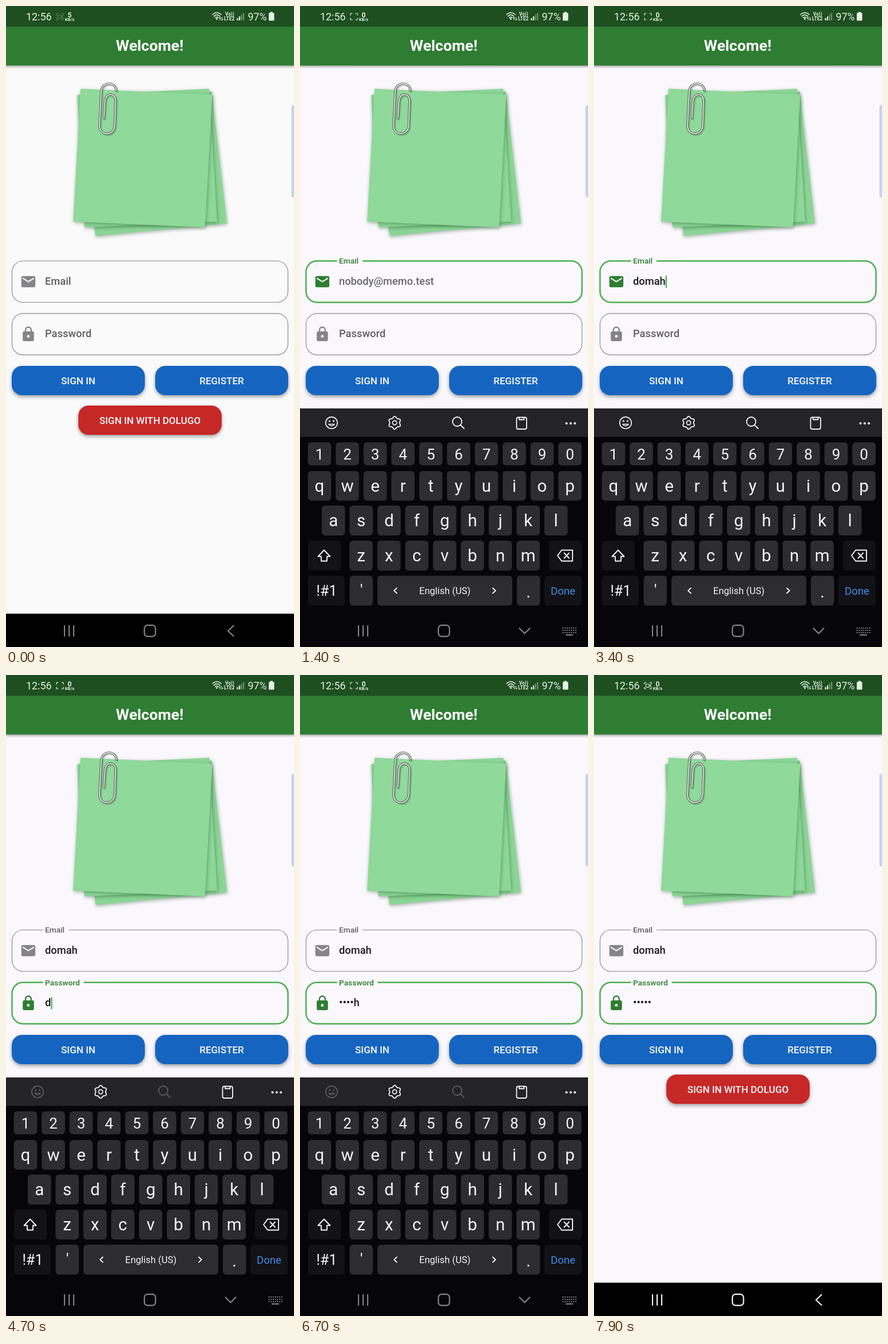
Write an HTML page that moves like this. It is 502 px wide and 1115 px high and loops after 8 s.

```html
<!DOCTYPE html>
<html lang="en">
<head>
<meta charset="utf-8">
<title>Sign in</title>
<style>
html, body { margin: 0; width: 100%; height: 100%; overflow: hidden; background: #000; }
svg { display: block; width: 502px; height: 1115px; }
text { font-family: Roboto, Inter, sans-serif; white-space: pre; }
.m { font-weight: 500; }
.line { fill: none; stroke-linecap: round; stroke-linejoin: round; }
.btn { filter: drop-shadow(0 3px 3px rgba(0, 0, 0, .36)); }
.sheet { filter: drop-shadow(1px 2px 3px rgba(20, 70, 30, .4)); }
</style>
</head>
<body>
<svg id="stage" viewBox="0 0 502 1115"></svg>
<script>
const LOOP = 8000, STEP = 100;
const WORD = 'domah', HINT = 'nobody@memo.test';
const GREEN = '#2e7d32', LIME = '#4caf50', GREY = '#5f5e61', ICON = '#858487';

const text = (x, y, s, size, fill, extra = '') =>
  `<text x="${x}" y="${y}" font-size="${size}" fill="${fill}" ${extra}>${s}</text>`;
const rect = (x, y, w, h, r, fill, extra = '') =>
  `<rect x="${x}" y="${y}" width="${w}" height="${h}" rx="${r}" fill="${fill}" ${extra}/>`;
const line = (d, color, width, extra = '') =>
  `<path class="line" d="${d}" stroke="${color}" stroke-width="${width}" ${extra}/>`;
const MID = 'text-anchor="middle"';

// Status bar
function statusBar() {
  const c = '#e6efe6';
  let s = rect(0, 0, 502, 36, 0, '#1d4f20');
  s += text(35, 25, '12:56', 17.9, c);
  s += line('M88 16V13H91M97 13H100V16M100 21V24H97M91 24H88V21', c, 1.2, 'id="corners"');
  s += `<g id="camera">${rect(90.5, 15.8, 5.6, 5.6, 1.2, 'none', `stroke="${c}" stroke-width="1.1"`)}
    ${line('M96.5 18L98.6 16.6V20.6L96.5 19.2', c, 1)}</g>`;
  s += text(111, 19.5, '', 12, c, `id="rate" font-weight="700" ${MID}`);
  s += text(111, 26.4, 'KB/s', 7.6, c, `font-weight="700" ${MID}`);
  s += line('M360 15Q367.5 8 375 15M362.4 17.8Q367.5 13 372.6 17.8M365 20.4Q367.5 18.2 370 20.4', c, 1.6);
  s += `<circle cx="367.5" cy="22.6" r="1.5" fill="${c}"/>`;
  s += line('M373.2 24.5V19.5L371.8 21M376.4 19.5V24.5L377.8 23', c, 1.1);
  s += text(382, 17, 'Vo))', 8.2, c, 'font-weight="700"');
  s += text(380, 25.3, 'LTE2', 8.4, c, 'font-weight="700"');
  [4, 7, 10, 13].forEach((h, i) => {
    s += rect(402.5 + i * 3.5, 25 - h, 2.2, h, .6, c, i > 1 ? 'opacity=".4"' : '');
  });
  s += text(421.5, 25, '97%', 17.9, c);
  return s + rect(458, 12, 9.5, 13.5, 1.2, c) + rect(460.5, 10.2, 4.5, 3, .6, c);
}

// Stack of sticky notes with a paper clip
function notes() {
  const sheet = (pts, fill) => `<polygon class="sheet" points="${pts}" fill="${fill}"/>`;
  const clip = 'M192 147C192 131 167 131 166 148L163 207C162 227 189 227 189.5 207L191 166C192 150 173 150 172.5 166L170.5 195';
  return sheet('130,172 358.5,149 385,378 156,400', '#8bd596') +
    sheet('124,155 354,144 368,375 137,385', '#8dd798') +
    sheet('130,144 359.5,154 347,385 117,375', '#8fd99a') +
    line(clip, 'rgba(30,80,40,.25)', 4, 'transform="translate(2 2)"') +
    line(clip, '#4e5450', 3.9) + line(clip, '#d9dcd9', 2.1);
}

const GLYPHS = {
  mail: 'M20 4H4c-1.1 0-1.99.9-1.99 2L2 18c0 1.1.9 2 2 2h16c1.1 0 2-.9 2-2V6c0-1.1-.9-2-2-2zm0 4l-8 5-8-5V6l8 5 8-5v2z',
  lock: 'M18 8h-1V6c0-2.76-2.24-5-5-5S7 3.24 7 6v2H6c-1.1 0-2 .9-2 2v10c0 1.1.9 2 2 2h12c1.1 0 2-.9 2-2V10c0-1.1-.9-2-2-2zm-6 9c-1.1 0-2-.9-2-2s.9-2 2-2 2 .9 2 2-.9 2-2 2zm3.1-9H8.9V6c0-1.71 1.39-3.1 3.1-3.1 1.71 0 3.1 1.39 3.1 3.1v2z'
};

function field(id, y, label, glyph) {
  return `<g id="${id}">` +
    rect(10.5, y, 481, 72, 19, 'none', 'class="box"') +
    rect(64.5, y - 3, 0, 6, 0, '#faf8fc', 'class="gap"') +
    `<path class="icon" d="${GLYPHS[glyph]}" transform="translate(24.3 ${y + 21.4}) scale(1.22)"/>` +
    text(68, 0, label, 18.3, GREY, 'class="m label"') +
    text(68, y + 41, '', 18.3, '#1b1a1d', 'class="m value"') +
    rect(68, y + 25.5, 2.3, 21, 0, LIME, 'class="caret"') + '</g>';
}

const button = (x, y, w, label, fill) =>
  rect(x, y, w, 51, 18, fill, 'class="btn"') +
  text(x + w / 2, y + 31.6, label, 17, '#fbfafc', `class="m" ${MID}`);

// Keyboard, drawn at its open position
const KEY = '#2d2c31', DARK = '#131217', INK = '#f4f3f6';
const ROWS = [['1234567890', 34, 759, 40], ['qwertyuiop', 34, 809, 51.5],
  ['asdfghjkl', 58.2, 869, 52], ['zxcvbnm', 106.6, 930, 52]];
const keyAt = {};

function keyboard() {
  let s = rect(0, 700, 502, 420, 0, '#060509') + rect(0, 700, 502, 49.5, 0, '#242328');
  s += `<g class="dim">${line('M44.8 725a10.2 10.2 0 1 0 20.4 0a10.2 10.2 0 1 0-20.4 0M50 727.5Q55 733.5 60 727.5Z', INK, 1.7)}
    <circle cx="51.5" cy="722" r="1.5" fill="${INK}"/><circle cx="58.5" cy="722" r="1.5" fill="${INK}"/></g>`;
  let gear = '';
  for (let i = 0; i < 48; i++) {
    const a = i * Math.PI / 24, r = 9.8 + 1.3 * Math.cos(6 * a);
    gear += `${i ? 'L' : 'M'}${(165 + r * Math.sin(a)).toFixed(1)} ${(725 - r * Math.cos(a)).toFixed(1)}`;
  }
  s += line(gear + 'Z', INK, 1.8) + `<circle cx="165" cy="725" r="3.6" fill="none" stroke="${INK}" stroke-width="1.7"/>`;
  s += `<g class="dim">${line('M266 723a8 8 0 1 0 16 0a8 8 0 1 0-16 0M280 729L286 735', INK, 1.8)}</g>`;
  s += rect(377.5, 715.5, 17.5, 20.5, 3, 'none', `stroke="${INK}" stroke-width="1.8"`) +
    line('M382 716V719.5H390.5V716', INK, 1.8);
  [464.5, 471.8, 479].forEach(x => s += `<circle cx="${x}" cy="726" r="2.1" fill="${INK}"/>`);

  ROWS.forEach(([chars, x0, y, h], row) => [...chars].forEach((c, i) => {
    const x = x0 + i * 48.5;
    keyAt[c] = { x, y };
    s += rect(x - 20.3, y, 40.6, h, 6, KEY, `data-key="${c}"`) +
      text(x, row ? y + 36.2 : y + 29.8, c, row ? 29.5 : 26, INK, MID);
  }));

  s += rect(14, 930, 57, 52, 6, DARK) + line('M42 946.5L52.5 957.5H47V965.5H37V957.5H31.5Z', INK, 1.9);
  s += rect(434, 930, 57, 52, 6, DARK) +
    line('M449 956L456 946.5H475V965.5H456ZM460.5 951.5L469 960.5M469 951.5L460.5 960.5', INK, 1.9);
  s += rect(14, 991, 64, 52, 6, DARK) + text(46.5, 1025.5, '!#1', 25, INK, MID);
  s += rect(86.5, 991, 40.5, 52, 6, KEY) + text(107, 1026, "'", 27, INK, MID);
  s += rect(135, 991, 235, 52, 6, KEY) + text(252.5, 1022.5, 'English (US)', 16.5, INK, MID) +
    line('M168.8 1012.5L164 1017L168.8 1021.5M336 1012.5L340.8 1017L336 1021.5', INK, 1.8);
  s += rect(378, 991, 40.5, 52, 6, KEY) + text(398, 1029, '.', 29, INK, MID);
  s += rect(426, 991, 65, 52, 6, DARK) + text(458.5, 1023.8, 'Done', 18.6, '#3f8ee8', MID);
  s += `<g id="popup">${rect(-38.5, -106, 77, 98, 9, '#1f1e23')}${text(0, -38, '', 42, INK, MID)}</g>`;
  return s;
}

function navBar() {
  let dots = '';
  for (let r = 0; r < 3; r++)
    for (let c = 0; c < 7; c++) dots += rect(457.5 + c * 3.7, 1081 + r * 4, 2, 2, .4, 'currentColor');
  return rect(317, 1056.5, 148.5, 60, 29.5, '#38373b', 'id="ripple"') +
    `<g id="nav">${line('M102 1078V1096M110 1078V1096M118 1078V1096', 'currentColor', 2.1)}
    ${rect(241.2, 1077.2, 19.4, 19.4, 5.5, 'none', 'stroke="currentColor" stroke-width="2.2"')}
    ${line('M396.5 1078L387 1087L396.5 1096', 'currentColor', 2.2, 'id="back"')}
    <g id="down">${line('M382.5 1082.5L391.5 1091.5L400.5 1082.5', 'currentColor', 2.2)}
    ${dots}${rect(463, 1093, 13, 2, .4, 'currentColor')}</g></g>`;
}

const svg = document.getElementById('stage');
svg.innerHTML = `<defs><clipPath id="view"><rect id="viewBox" y="36" width="502"/></clipPath>
  <linearGradient id="fall" x1="0" y1="0" x2="0" y2="1"><stop stop-opacity=".32"/><stop offset="1" stop-opacity="0"/></linearGradient></defs>` +
  rect(0, 0, 502, 1057, 0, '#faf8fc', 'id="page"') +
  `<g clip-path="url(#view)">${notes()}${field('email', 443.5, 'Email', 'mail')}${field('pass', 534.8, 'Password', 'lock')}
  ${button(10, 626, 232, 'SIGN IN', '#1565c0')}${button(260, 626, 232, 'REGISTER', '#1565c0')}
  ${button(126, 695, 250, 'SIGN IN WITH DOLUGO', '#c62828')}</g>` +
  rect(0, 103, 502, 6, 0, 'url(#fall)') + rect(0, 36, 502, 67.5, 0, '#2f7c33') +
  text(250.5, 77.8, 'Welcome!', 26.6, '#fcfdfc', `font-weight="700" ${MID}`) +
  statusBar() + rect(497.5, 172, 9, 161, 4, '#c6d1ef') +
  rect(0, 1057, 502, 58, 0, '#000') + `<g id="board">${keyboard()}</g>` + navBar();

const $ = q => svg.querySelector(q);
const set = (el, attrs) => { for (const k in attrs) el.setAttribute(k, attrs[k]); };
const show = (el, on) => set(el, { opacity: +on });

// [time, value] tables: the last entry not later than t holds
const at = (table, t) => table.reduce((v, [time, val]) => t >= time ? val : v, table[0][1]);

const BOARD = [[0, 1115], [800, 985], [900, 803.5], [1000, 737], [1100, 709], [1200, 700],
  [7600, 775], [7700, 925], [7800, 1060], [7900, 1115]];
const RATE = [[0, 5], [400, 0], [2400, 1], [3400, 0]];
const RIPPLE = [[0, 0], [7400, .6], [7500, 1], [7600, .7], [7700, .3], [7800, 0]];
const EMAIL = [[0, 0], [1800, 1], [2200, 2], [2600, 3], [2900, 4], [3100, 5]];
const PASS = [[0, 0], [4500, 1], [5000, 2], [5400, 3], [5900, 4], [6100, 5]];
const PRESS = [[0, ''], [1700, 'd'], [1900, ''], [2100, 'o'], [2200, ''], [2500, 'm'], [2700, ''],
  [2800, 'a'], [2900, ''], [3000, 'h'], [3200, ''], [4400, 'd'], [4700, ''], [4900, 'o'], [5100, ''],
  [5300, 'm'], [5400, ''], [5600, 'a'], [5900, ''], [6000, 'h'], [6200, '']];
const CARET = [[0, 0], [800, 1], [1400, 0], [1800, 1], [3700, 0], [3800, 1], [4200, 0], [4500, 1],
  [6700, 0], [7200, 1], [7700, 0]];

function drawField(id, y, t, start, focused, value, labelWidth, bg) {
  const g = $('#' + id), p = Math.max(0, Math.min(1, (t - start + 100) / 300));
  const part = c => g.querySelector('.' + c);
  set(part('box'), { stroke: focused ? LIME : '#8b8a8d', 'stroke-width': focused ? 2.5 : 1.15 });
  set(part('gap'), { width: labelWidth * p, fill: bg });
  set(part('icon'), { fill: focused ? GREEN : ICON });
  set(part('label'), { y: y + 41.5 - 36.7 * p, 'font-size': 18.3 - 4.6 * p, fill: focused ? GREEN : GREY });
  const hint = id === 'email' && !value && p === 1;
  const v = part('value');
  v.textContent = hint ? HINT : value;
  set(v, { fill: hint ? '#68676a' : '#1b1a1d' });
  set(part('caret'), { x: 68 + (value ? v.getComputedTextLength() : 0) });
  show(part('caret'), focused && at(CARET, t));
}

function draw(t) {
  const bg = t < 400 ? '#fafafa' : '#faf8fc';
  set($('#page'), { fill: bg });

  const top = at(BOARD, t);
  set($('#board'), { transform: `translate(0 ${top - 700})` });
  show($('#board'), top < 1115);
  set($('#viewBox'), { height: Math.min(top - 10, 1057) - 36 });

  const inPass = t >= 3700, n = at(PASS, t);
  const masked = t >= 7700 ? '•'.repeat(n) : n ? '•'.repeat(n - 1) + WORD[n - 1] : '';
  drawField('email', 443.5, t, 700, t >= 700 && !inPass, WORD.slice(0, at(EMAIL, t)), 44.5, bg);
  drawField('pass', 534.8, t, 3700, inPass, masked, 71, bg);

  svg.querySelectorAll('.dim').forEach(el => set(el, { opacity: inPass ? .27 : 1 }));
  const key = at(PRESS, t), popup = $('#popup');
  svg.querySelectorAll('[data-key]').forEach(el =>
    set(el, { fill: el.dataset.key === key ? '#47464b' : KEY }));
  show(popup, key);
  popup.style.display = key ? '' : 'none';
  if (key) {
    set(popup, { transform: `translate(${keyAt[key].x} ${keyAt[key].y})` });
    popup.querySelector('text').textContent = key;
  }

  const typing = t >= 800 && t < 7400;
  show($('#down'), typing);
  show($('#back'), !typing);
  set($('#nav'), { color: t >= 7400 ? '#f3f3f4' : '#858488' });
  show($('#ripple'), 0);
  set($('#ripple'), { opacity: at(RIPPLE, t) });

  // The recording mark blinks half a second on, half a second off
  const lit = (t + 100) % 1000 < 500;
  set($('#camera'), { opacity: t < 100 ? .35 : +lit });
  set($('#corners'), { opacity: t < 100 ? .35 : 1 });
  $('#rate').textContent = at(RATE, t);
}

let last = -1;
const origin = performance.now();
function tick() {
  const t = Math.floor((performance.now() - origin) % LOOP / STEP) * STEP;
  if (t !== last) draw(last = t);
  requestAnimationFrame(tick);
}
tick();
</script>
</body>
</html>
```
